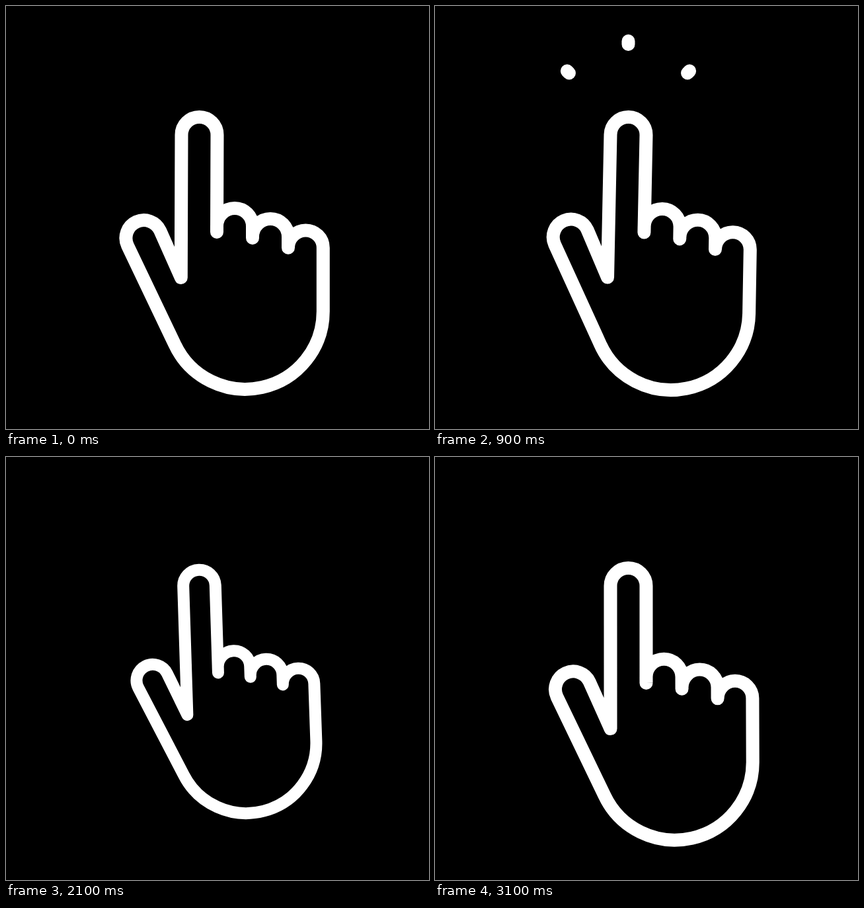
These frames come from a looping animation (640x640 px, 3200 ms). An HTML page:

```html
<!DOCTYPE html>
<html lang="en">
<head>
<meta charset="utf-8">
<title>Tapping hand</title>
<style>
  html, body { margin: 0; height: 100%; overflow: hidden; background: #000; }
  svg { display: block; width: 100%; height: 100%; }
</style>
</head>
<body>
<svg viewBox="0 0 640 640" fill="none" stroke="#fff" stroke-width="20"
     stroke-linecap="round" stroke-linejoin="round">
  <path id="hand" d="M319 342L319.5 195a27 27 0 0 0-54 0L264.8 411L233.1 339.8A27 27 0 0 0 184 362.6
    L255.1 511.5A117.8 117.8 0 0 0 479.8 462V365.8a26.4 26.4 0 0 0-52.8 0V349a27 27 0 0 0-54 0v2V333a27 27 0 0 0-54 0Z"/>
  <g id="rays" transform="translate(292.5 191)"></g>
</svg>
<script>
const LOOP = 3200, TAP = 1600, STEP = 100;
const TILT = 2; // degrees to either side

const clamp = v => Math.min(1, Math.max(0, v));
const mix = (a, b, k) => a + (b - a) * k;
const progress = (t, from, to) => clamp((t - from) / (to - from));

const hand = document.getElementById('hand');
const group = document.getElementById('rays');
const rays = [-45, 0, 45].map(angle => {
  const line = group.appendChild(document.createElementNS(group.namespaceURI, 'line'));
  line.setAttribute('transform', `rotate(${angle})`);
  return { line, inner: 78, outer: angle ? 131 : 138 };
});

// Lean right, swing to the left, rest there, then return upright
const swayAt = t =>
  TILT * (progress(t, 0, 600) - 2 * progress(t, 600, 1800) + progress(t, 2200, LOOP));

function draw(t) {
  const u = t % TAP;
  const press = 1 - clamp(Math.abs(u - 500) / 200);
  hand.setAttribute('transform',
    `translate(292.5 195) rotate(${swayAt(t)}) scale(${1 - 0.1 * press}) translate(-292.5 -195)`);

  const head = progress(u, 500, 700), tail = progress(u, 700, 918);
  group.setAttribute('visibility', head > 0 && tail < 1 ? 'visible' : 'hidden');
  for (const { line, inner, outer } of rays) {
    line.setAttribute('y1', -mix(inner, outer, tail));
    line.setAttribute('y2', -mix(inner, outer, head));
  }
}

function tick() {
  draw(Math.floor(performance.now() % LOOP / STEP) * STEP);
  requestAnimationFrame(tick);
}
tick();
</script>
</body>
</html>
```
